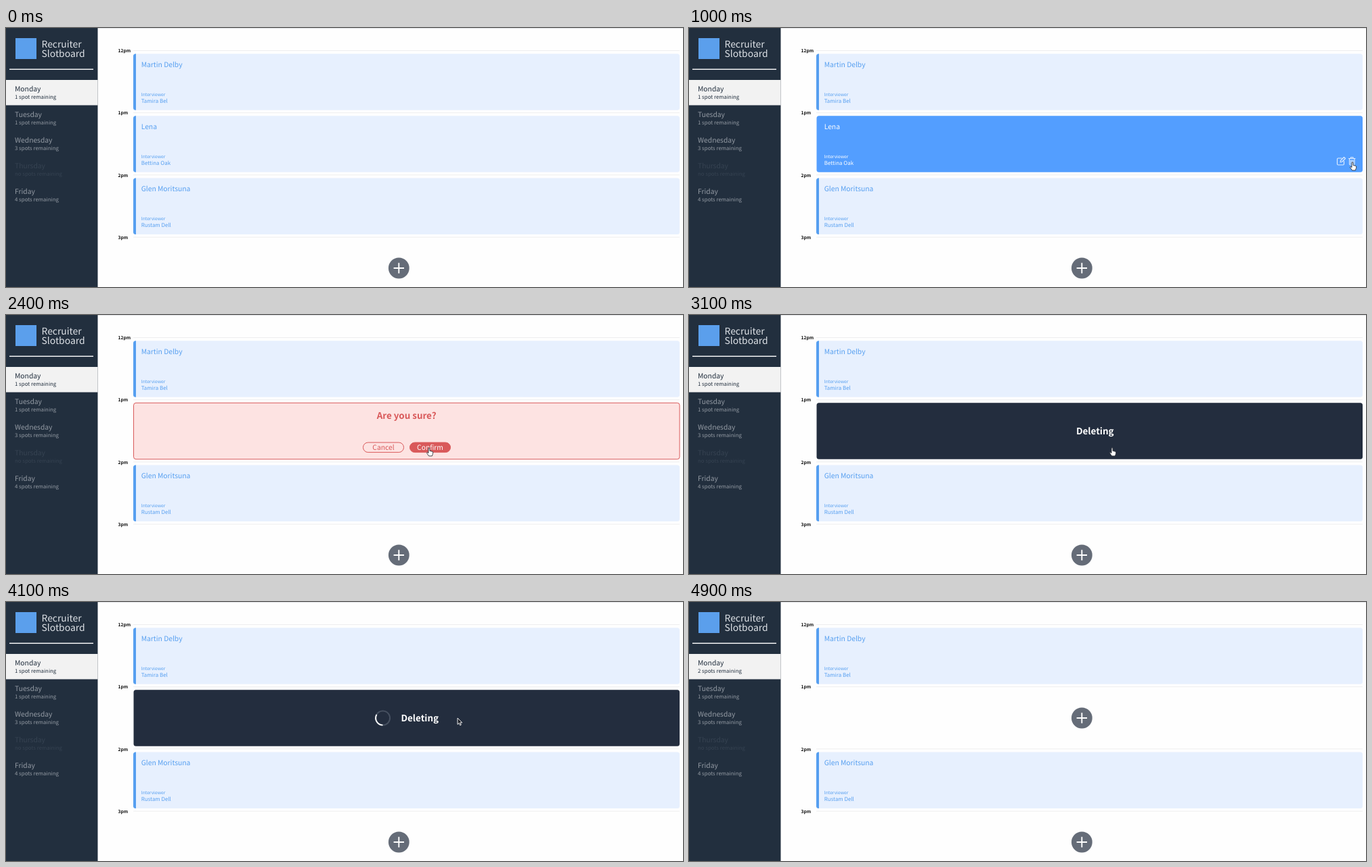
An HTML page that plays this animation: 1000x384 px, repeating every 5600 ms.

```html
<!DOCTYPE html>
<html lang="en">
<head>
<meta charset="utf-8">
<title>Booking board</title>
<style>
  html, body { margin: 0; width: 100%; height: 100%; overflow: hidden; background: #fefefe; }
  svg { display: block; width: 100vw; height: 100vh; }
  text {
    font-family: "Noto Sans CJK JP", "Noto Sans CJK SC", "Noto Sans", sans-serif;
    font-size: 10.3px; text-rendering: geometricPrecision;
  }
  .brand { font-size: 13.9px; font-weight: 300; fill: #dde1e6; }
  .day { fill: #949ba4; }
  .spots { font-size: 7.85px; font-weight: 300; }
  .on { fill: #222f3e; }
  .full { fill: #364352; }
  .hour { font-size: 6.7px; font-weight: 700; fill: #111; }
  .label { font-size: 6.7px; font-weight: 300; }
  .who { font-size: 7.95px; font-weight: 500; }
  .mid { text-anchor: middle; }
  .big { font-size: 13.4px; font-weight: 600; }
  .line { fill: none; stroke-linecap: round; stroke-linejoin: round; }
</style>
</head>
<body>
<svg id="stage" viewBox="0 0 1000 384"></svg>
<script>
const LOOP = 5600, STEP = 100;
const BLUE = '#539eff', INK = '#569ff0', RED = '#d9595a', DARK = '#232d3e';

const text = (x, y, str, cls, attrs = '') =>
  `<text x="${x}" y="${y}" class="${cls}" ${attrs}>${str}</text>`;

const panel = (y, fill, attrs = '') =>
  `<rect x="188.5" y="${y}" width="806.5" height="83.5" rx="3.5" fill="${fill}" ${attrs}/>`;

const details = (y, name, host) =>
  text(199.7, y + 19.5, name, '') +
  text(199.7, y + 62.5, 'Interviewer', 'label') +
  text(199.7, y + 72.4, host, 'who');

const card = (y, name, host) =>
  panel(y, '#e7f0fe') +
  `<path d="M192 ${y}v83.5h-.5a3.5 3.5 0 0 1-3.5-3.5v-76.5a3.5 3.5 0 0 1 3.5-3.5z" fill="${INK}"/>
  <g fill="${INK}">${details(y, name, host)}</g>`;

const plus = y =>
  `<circle cx="580.3" cy="${y}" r="15.4" fill="#656c78"/>
  <path d="M572.6 ${y}h15.4m-7.7-7.7v15.4" stroke="#fff" stroke-width="1.9"/>`;

const pill = (id, x, label) =>
  `<g id="${id}"><rect x="${x}" y="189" width="60" height="14.6" rx="7.3" stroke="${RED}"/>` +
  text(x + 30, 200, label, 'mid') + '</g>';

const day = (i, name, spots, cls = 'day') => {
  const y = 94.2 + i * 38;
  return `<g class="${cls}">${text(13, y, name, '')}` +
    text(13, y + 11, spots, 'spots', i ? '' : 'id="left"') + '</g>';
};

const hour = (i, label) => {
  const y = 33.5 + i * 92.2;
  return `<path d="M188 ${y}H995" stroke="#eeeeef"/>` + text(165.6, y + 2.6, label, 'hour');
};

const guest = ['Lena', 'Bettina Oak'];

document.getElementById('stage').innerHTML = `
  <rect width="1000" height="384" fill="#fefefe"/>
  <path d="M135 .5H1000" stroke="#e3e5e8"/>
  <rect width="135.5" height="384" fill="#222f3e"/>
  <rect x="14" y="15" width="31" height="31" fill="#5b9fec"/>
  ${text(52.5, 28.7, 'Recruiter', 'brand')}
  ${text(52.5, 42.8, 'Slotboard', 'brand')}
  <path d="M5 61.3H129" stroke="#f2f3f4" stroke-width="1.6"/>
  <rect y="77" width="135.5" height="37.5" fill="#f2f2f2"/>
  ${day(0, 'Monday', '', 'on')}
  ${day(1, 'Tuesday', '1 spot remaining')}
  ${day(2, 'Wednesday', '3 spots remaining')}
  ${day(3, 'Thursday', 'no spots remaining', 'full')}
  ${day(4, 'Friday', '4 spots remaining')}
  ${['12pm', '1pm', '2pm', '3pm'].map((h, i) => hour(i, h)).join('')}
  ${card(38.2, 'Martin Delby', 'Tamira Bel')}
  ${card(222.5, 'Glen Moritsuna', 'Rustam Dell')}
  ${plus(356)}
  <g id="rest">${card(130.3, ...guest)}</g>
  <g id="hover">
    ${panel(130.3, BLUE)}
    <g fill="#fff">${details(130.3, ...guest)}</g>
    <g class="line" stroke="#e4efff" stroke-width="1.1">
      <path d="M964 193h-5q-1.500 0-1.500 1.500v7q0 1.500 1.500 1.500h7q1.500 0 1.500-1.500v-4M962 199l.5-2.500 5-5 2 2-5 5z"/>
      <path d="M974.500 193.500h9.500m-6.500 0v-1.800h3.500v1.800m-5.500 0v8q0 1.500 1.500 1.500h4.500q1.500 0 1.500-1.500v-8m-5.500 2.500v5m1.800-5v5m1.800-5v5"/>
    </g>
  </g>
  <g id="ask">
    ${panel(130.3, '#fde3e2', `stroke="${RED}"`)}
    ${text(591.6, 154.2, 'Are you sure?', 'big mid', `fill="${RED}"`)}
    <g fill="${RED}">${pill('cancel', 527.5, 'Cancel')}${pill('confirm', 596.5, 'Confirm')}</g>
  </g>
  <g id="busy">
    ${panel(130.3, DARK)}
    ${text(572, 177, 'Deleting', 'big', 'id="status" fill="#fff"')}
    <g id="spinner" class="line" stroke-width="2">
      <circle r="10.500" stroke="#465060"/>
      <path d="M6 8.600A10.500 10.500 0 0 0 6 -8.600" stroke="#f4f5f6"/>
    </g>
  </g>
  <g id="free">${plus(172)}</g>
  <g id="cursor" stroke-linejoin="round">
    <path id="arrow" d="M0 0v9.500l2.200-2 1.500 3.300 1.600-.7-1.500-3.200h3z" fill="#1d2028" stroke="#fff" stroke-width=".9"/>
    <path id="hand" d="M-1 1q0-1.200 1-1.200t1 1.200v3.500l3.200.7q1.600.4 1.500 2l-.5 2.500-.9 2.300h-4.800l-2.500-3.700q-.9-1.500.3-1.800l1.700 1.200z" fill="#fff" stroke="#30343c" stroke-width=".9"/>
  </g>`;

const el = id => document.getElementById(id);
const show = (id, on) => { el(id).style.display = on ? '' : 'none'; };
const within = (t, a, b) => t >= a && t < b;

// time, x, y of the pointer tip
const path = [
  [0, 1004, 238], [500, 978.5, 203], [1000, 980, 199], [1700, 980, 199], [2400, 625, 197],
  [3300, 625, 197], [4100, 667, 172], [4400, 667, 172], [4900, 1004, 150]
];

function pointer(t) {
  const i = path.findIndex(k => k[0] > t);
  if (i < 0) return path[path.length - 1].slice(1);
  const [t0, x0, y0] = path[i - 1], [t1, x1, y1] = path[i];
  const p = (t - t0) / (t1 - t0), e = p * p * (3 - 2 * p);
  return [x0 + (x1 - x0) * e, y0 + (y1 - y0) * e];
}

function draw(t) {
  show('rest', t < 300);
  show('hover', within(t, 300, 1500));
  show('ask', within(t, 1500, 3100));
  show('busy', within(t, 3100, 4200));
  show('free', t >= 4200);
  el('left').textContent = t < 4200 ? '1 spot remaining' : '2 spots remaining';

  el('cancel').firstChild.setAttribute('fill', 'none');
  const armed = t >= 2400;
  el('confirm').firstChild.setAttribute('fill', armed ? RED : 'none');
  el('confirm').lastChild.setAttribute('fill', armed ? '#fff' : RED);

  const loaded = t >= 3200;
  show('spinner', loaded);
  el('status').setAttribute('x', loaded ? 583.5 : 572);
  el('spinner').setAttribute('transform', `translate(556.6 172) rotate(${150 + (t - 4100) * .36})`);

  const hand = within(t, 800, 1800) || within(t, 2400, 3200);
  show('cursor', within(t, 100, 4900));
  show('hand', hand);
  show('arrow', !hand);
  el('cursor').setAttribute('transform', `translate(${pointer(t).join(' ')})`);
}

const start = performance.now();
function tick() {
  const t = (performance.now() - start) % LOOP;
  draw(Math.floor(t / STEP) * STEP);
  requestAnimationFrame(tick);
}
tick();
</script>
</body>
</html>
```
